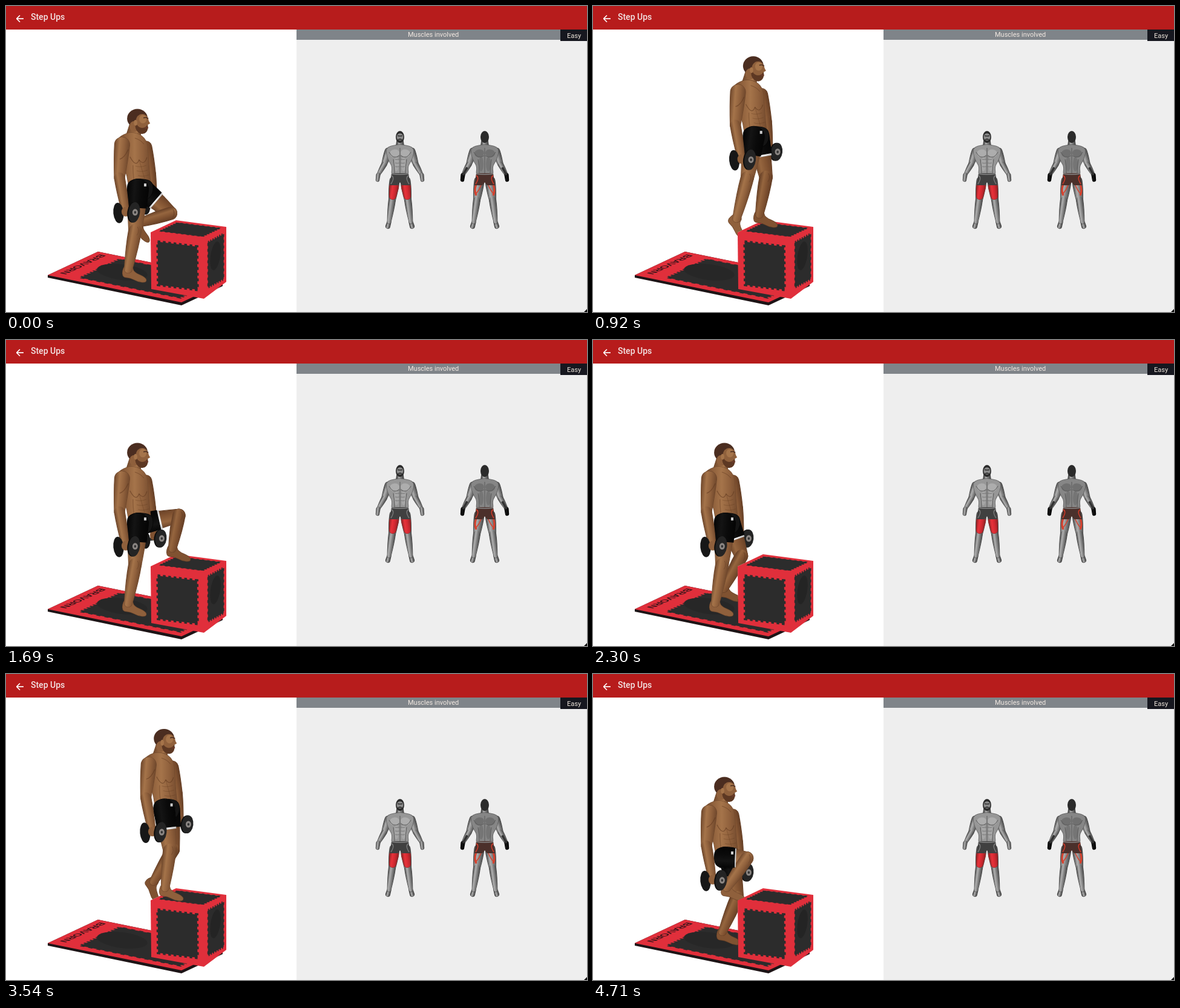
An HTML page with a canvas for the animation above (4.79 s loop, 960 by 507 pixels).

```html
<!DOCTYPE html>
<html lang="en">
<head>
<meta charset="utf-8">
<title>Step Ups</title>
<style>
html, body { margin: 0; width: 100%; height: 100%; overflow: hidden; background: #fff; }
canvas { display: block; width: 960px; height: 507px; }
</style>
</head>
<body>
<canvas id="stage" width="960" height="507"></canvas>
<script>
const LOOP = 4790, STEPS = 62, REP2 = 2300, REP_SHIFT = 2600;
const RED = '#e02f3b', DARK = '#2c2c2c', HAIR = '#4b2d20', BEARD = '#5d3823';
const SKIN = ['#70482c', '#a5744a', '#8f603c'];
const SKIN_FAR = ['#643e25', '#96663f', '#805231'];
const CLOTH = ['#050505', '#141414', '#0a0a0a'];
const HEM = ['#bbb', '#fff', '#eee'];
const GREY = ['#4a4a4a', '#b0b0b0', '#7c7c7c'];
const THIGH_RED = ['#8d2325', '#e8323a', '#cf2830'];
const INK = 'rgba(88,50,26,.5)', FAINT = 'rgba(88,50,26,.3)';

const add = (p, x, y) => [p[0] + x, p[1] + y];
const mix = (a, b, k) => [a[0] + (b[0] - a[0]) * k, a[1] + (b[1] - a[1]) * k];
const polar = (p, angle, r) => add(p, Math.sin(angle) * r, -Math.cos(angle) * r);

function ease(t, from, to) {
  const k = Math.min(1, Math.max(0, (t - from) / (to - from)));
  return k * k * (3 - 2 * k);
}
const hold = (t, a, b, c, d) => ease(t, a, b) * (1 - ease(t, c, d));
const pulse = (t, mid, width) => Math.abs(t - mid) < width ? Math.cos((t - mid) / width * Math.PI / 2) ** 2 : 0;

// ---------- drawing helpers ----------
function rect(c, x, y, w, h, color) {
  c.fillStyle = color;
  c.fillRect(x, y, w, h);
}

function poly(c, pts, fill) {
  c.beginPath();
  pts.forEach(p => c.lineTo(...p));
  c.closePath();
  c.fillStyle = fill;
  c.fill();
}

function blob(c, pts, fill, edge) {
  c.beginPath();
  c.moveTo(...mix(pts[pts.length - 1], pts[0], .5));
  pts.forEach((p, i) => c.quadraticCurveTo(...p, ...mix(p, pts[(i + 1) % pts.length], .5)));
  c.closePath();
  c.strokeStyle = edge;
  c.lineWidth = 1.4;
  c.stroke();
  c.fillStyle = fill;
  c.fill();
}

function ellipse(c, [x, y], rx, ry, fill, turn = 0) {
  c.beginPath();
  c.ellipse(x, y, rx, ry, turn, 0, 7);
  c.fillStyle = fill;
  c.fill();
}

function curve(c, a, ctrl, b, color, width = 1) {
  c.beginPath();
  c.moveTo(...a);
  c.quadraticCurveTo(...ctrl, ...b);
  c.strokeStyle = color;
  c.lineWidth = width;
  c.stroke();
}

function limbPath(c, a, b, ra, rb, bulge, flat) {
  const turn = Math.atan2(b[1] - a[1], b[0] - a[0]), right = Math.PI / 2;
  const side = (p, r) => add(p, -Math.sin(turn) * r, Math.cos(turn) * r);
  const belly = mix(a, b, .4), r = (ra + rb) / 2 + bulge * 2;
  c.beginPath();
  c.arc(...a, ra, turn + right, turn - right);
  c.quadraticCurveTo(...side(belly, -r), ...side(b, -rb));
  if (flat) c.lineTo(...side(b, rb));
  else c.arc(...b, rb, turn - right, turn + right);
  c.quadraticCurveTo(...side(belly, r), ...side(a, ra));
  c.closePath();
  return c.createLinearGradient(...side(a, ra), ...side(a, -ra));
}

function chain(c, pts, radii, bulge, tone, flat) {
  for (const outline of [true, false]) {
    for (let i = 0; i + 1 < pts.length; i++) {
      const shade = limbPath(c, pts[i], pts[i + 1], radii[i], radii[i + 1], bulge, flat);
      [tone[0], tone[1], tone[2], tone[0]].forEach((s, k) => shade.addColorStop(k / 3, s));
      c.strokeStyle = tone[0];
      c.lineWidth = 1.2;
      c.fillStyle = shade;
      outline ? c.stroke() : c.fill();
    }
  }
}

// ---------- static scene ----------
function panel(c, o, x, y, [l, t, r, b], tooth) {
  c.save();
  c.transform((x[0] - o[0]) / 100, (x[1] - o[1]) / 100, (y[0] - o[0]) / 100, (y[1] - o[1]) / 100, ...o);
  c.strokeStyle = DARK;
  rect(c, l, t, r - l, b - t, DARK);
  c.setLineDash([tooth, tooth]);
  c.lineWidth = tooth;
  c.strokeRect(l, t, r - l, b - t);
  c.restore();
}

function mat(c) {
  const left = [69, 446], top = [152, 407], low = [290, 491], right = [373, 452];
  c.save();
  c.beginPath();
  c.rect(0, 380, 358, 127);
  c.clip();
  poly(c, [left, top, right, add(right, 0, 5), add(low, 0, 5), add(left, 0, 4)], '#1d1416');
  poly(c, [left, top, right, low], RED);
  panel(c, left, low, top, [20, 12, 94, 91], 3);
  ellipse(c, [192, 441], 42, 13, '#272727', .12);
  c.transform(-.905, .425, -.98, -.195, 126, 428);
  c.font = '800 15px "Liberation Sans", Arial, sans-serif';
  c.textAlign = 'center';
  c.textBaseline = 'middle';
  c.fillStyle = '#35151a';
  c.fillText('BRAVORN', 0, 0);
  c.restore();
}

const BOX = [[239, 375], [281, 355], [364, 366], [364, 457], [327, 485], [240, 469]];
function box(c) {
  const [left, back, right, rightLow, low, leftLow] = BOX, corner = [327, 386];
  poly(c, BOX, RED);
  panel(c, left, corner, leftLow, [13, 15, 87, 91], 5);
  panel(c, corner, right, add(low, 0, -4), [18, 10, 88, 88], 5);
  panel(c, left, corner, back, [10, 15, 90, 85], 5);
  ellipse(c, [346, 414], 8, 24, '#242424', .15);
}

function muscleMan(c, cx, back) {
  const at = (x, y) => [cx + x, y], line = '#5a5a5a', flank = back ? '#d03a2a' : '#777';
  for (const s of [-1, 1]) {
    const hip = at(s * 9, 290), knee = at(s * 13, 321), ankle = at(s * 18, 358);
    chain(c, [ankle, at(s * 20, 365)], [3, 3.5], 0, GREY);
    chain(c, [hip, knee, ankle], [8, 5.5, 2.8], .7, GREY);
    if (back) {
      curve(c, at(s * 14, 296), at(s * 18, 305), at(s * 14, 314), '#d8402c', 3);
      curve(c, at(s * 6, 297), at(s * 9, 305), at(s * 15, 312), '#d8402c', 1.5);
    } else chain(c, [at(s * 10, 300), at(s * 12, 315)], [7.5, 5.5], 0, THIGH_RED);
    const elbow = at(s * 26, 262), wrist = at(s * 36, 280);
    chain(c, [at(s * 19, 241), elbow, wrist], [6, 4.2, 2.2], .5, GREY);
    chain(c, [wrist, at(s * 37, 288)], [3, 2.6], 0, back ? CLOTH : GREY);
    if (back) curve(c, mix(elbow, wrist, .3), mix(elbow, wrist, .5), wrist, '#333', 4);
  }
  chain(c, [at(0, 222), at(0, 237)], [5, 7], 0, GREY);
  blob(c, [at(-6, 230), at(-24, 235), at(-20, 254), at(-12, 266), at(-15, 282),
    at(15, 282), at(12, 266), at(20, 254), at(24, 235), at(6, 230)], back ? '#868686' : '#979797', line);
  for (const s of [-1, 1]) {
    ellipse(c, at(s * 9, 244), 8, 6.5, back ? '#707070' : '#adadad', s * .2);
    ellipse(c, at(s * 6, 262), 4, 12, back ? '#757575' : '#a6a6a6');
    curve(c, at(s, 248), at(s * 12, 255), at(s * 18, 242), line);
    curve(c, at(s * 11, 254), at(s * 9, 265), at(s * 9, 277), line);
    if (!back) for (let y = 254; y < 272; y += 6) curve(c, at(s, y), at(s * 4, y + 1), at(s * 8, y), '#777');
  }
  curve(c, at(0, 235), at(0, 255), at(0, 277), line);
  poly(c, [at(-14, 277), at(14, 277), at(17, 297), at(4, 297), at(0, 292), at(-4, 297), at(-17, 297)], back ? '#4b302b' : '#404040');
  curve(c, at(-14, 278), at(0, 280), at(14, 278), '#888', 1.5);
  for (const s of [-1, 1]) curve(c, at(s * 14, 281), at(s * 8, 284), at(s * 15, 295), flank, 1.5);
  ellipse(c, at(0, 217), 7, 10, '#2b2b2b');
  if (!back) {
    ellipse(c, at(0, 217), 5.5, 6, '#8b8b8b');
    curve(c, at(-4, 215), at(0, 216), at(4, 215), '#333', 1.5);
    curve(c, at(-3, 222), at(0, 219), at(3, 222), '#333', 2);
  }
}

function text(c, s, x, y, font, color) {
  c.font = font + ' Roboto, sans-serif';
  c.fillStyle = color;
  c.fillText(s, x, y);
}

function scene(c) {
  rect(c, 0, 0, 960, 507, '#fff');
  rect(c, 480, 39, 480, 468, '#eee');
  rect(c, 0, 0, 960, 39, '#b71c1c');
  rect(c, 480, 39, 480, 17, '#7f8489');
  rect(c, 916, 39, 44, 19, '#16171f');
  poly(c, [[960, 502], [960, 507], [955, 507]], '#111');
  text(c, 'Step Ups', 41, 23, '500 14px', '#f3e6e6');
  text(c, 'Muscles involved', 664, 51, '11px', '#f2e9e2');
  text(c, 'Easy', 927, 53, '11px', '#eee6dc');
  const tip = [17.5, 21];
  curve(c, tip, tip, [29, 21], '#fff', 1.7);
  for (const s of [-1, 1]) curve(c, tip, tip, add(tip, 5.5, s * 5.5), '#fff', 1.7);
  mat(c);
  box(c);
  muscleMan(c, 651, false);
  muscleMan(c, 791, true);
}

// ---------- motion, u = time within one repetition ----------
function bodyAt(u) {
  const rise = hold(u, 400, 1040, 1150, 1640);
  const bend = .9 * pulse(u, 570, 330) + 1.1 * pulse(u, 1410, 290);
  const hip = [221 + 52 * rise, 302 - 95 * rise];
  const neck = polar(hip, -.14 + .36 * bend, 87);
  const tilt = .6 * bend;
  const near = add(neck, -17, 14), far = add(neck, 22, 18);
  return {
    hip, neck, near, far, tilt,
    head: polar(neck, .35 + tilt, 27),
    handN: add(near, 5 + 9 * bend, 108 - 10 * bend),
    handF: add(far, 13 + 16 * bend, 85 - 11 * bend)
  };
}

// Ankle and foot turn of the leg that steps up first, and of the one that follows.
const leadFoot = u => ({
  ankle: [202 + 61 * hold(u, -60, 260, 1800, 2300), 436 - 82 * hold(u, -300, 110, 2110, 2290)],
  turn: .5 * pulse(u, 0, 250),
  thigh: 68 - 26 * pulse(u, 2090, 250)
});
const trailFoot = u => ({
  ankle: [202 + 52 * hold(u, 480, 1200, 1150, 1650), 436 - 84 * hold(u, 440, 900, 1240, 1650)],
  turn: .9 * pulse(u, 800, 380) + pulse(u, 1420, 230),
  thigh: 68
});

// Middle joint of a two-part limb; the sign of flex picks the side it bends to.
function joint(a, b, la, lb, flex) {
  const dx = b[0] - a[0], dy = b[1] - a[1], d = Math.hypot(dx, dy);
  const along = Math.min(la, (la * la - lb * lb + d * d) / (2 * d));
  const out = flex * Math.sqrt(Math.max(16, la * la - along * along)) / d;
  return add(mix(a, b, along / d), dy * out, -dx * out);
}

// ---------- athlete ----------
function dumbbell(c, hand, far) {
  const shift = far ? -3 : 0, ry = far ? 15 : 17;
  const left = add(hand, -11 + shift, far ? 12 : 5), right = add(hand, 15 + shift, far ? 10 : 4);
  curve(c, left, left, right, '#333', 5);
  ellipse(c, left, 8.5, ry, '#171717', -.1);
  ellipse(c, add(hand, 1, far ? 5 : 3), 7, 8, far ? SKIN_FAR[2] : SKIN[2]);
  ellipse(c, add(right, -2, 0), 9.5, ry, '#0c0c0c', .12);
  ellipse(c, right, 9.5, ry, '#242424', .12);
  ellipse(c, add(right, 1.5, 0), 4.5, 5.5, '#8a8582');
  ellipse(c, add(right, 1.5, 0), 1.8, 2.2, '#333');
}

function foot(c, ankle, turn, tone) {
  c.save();
  c.translate(...ankle);
  c.rotate(turn);
  blob(c, [[-7, -7], [-11, 13], [4, 14], [16, 21], [30, 22], [29, 14], [8, 5], [7, -7]], tone[2], tone[0]);
  c.restore();
}

function leg(c, hip, { ankle, turn, thigh }, isFar, lead) {
  const tone = isFar ? SKIN_FAR : SKIN, behindBox = ankle[0] < 240;
  const heel = isFar ? add(ankle, 12, -9) : ankle, top = add(hip, isFar ? 5 : -3, 2);
  const knee = joint(top, heel, thigh, 63, .85);
  c.save();
  if (behindBox) {
    c.beginPath();
    c.rect(0, 0, 480, 507);
    BOX.forEach((p, i) => i ? c.lineTo(...p) : c.moveTo(...p));
    c.closePath();
    c.clip('evenodd');
  }
  foot(c, heel, turn, tone);
  chain(c, [top, knee, heel], [16, 10.5, 6.5], 1.2, tone);
  curve(c, add(knee, 4, -6), add(knee, 8, 1), add(knee, 3, 8), tone[0], .8);
  c.restore();
  if (lead) chain(c, [top, mix(top, knee, .49)], [17, 15], 0, HEM, true);
  chain(c, [top, mix(top, knee, .44)], [17.5, 16], 0, CLOTH, true);
}

function drawHead(c, at, tilt) {
  c.save();
  c.translate(...at);
  c.rotate(tilt * .45);
  ellipse(c, [-1, -4], 17, 16, HAIR);
  ellipse(c, [-6, 9], 8, 9, SKIN[2]);
  ellipse(c, [6, 9], 10.5, 12.5, BEARD, -.25);
  ellipse(c, [7, 0], 10.5, 11.5, SKIN[2]);
  ellipse(c, [8, -3], 6, 7, SKIN[1]);
  poly(c, [[15, -5], [20, 4], [15, 7]], SKIN[2]);
  ellipse(c, [-4, 3], 2.8, 4.8, SKIN[1]);
  curve(c, [9, -5], [13, -7], [17, -4], HAIR, 1.6);
  curve(c, [11, 11], [14, 12], [17, 11], '#6f3c2d', 1.4);
  c.restore();
}

function torso(c, { hip, neck, near, far }) {
  const waistL = add(hip, -18, -8), waistR = add(hip, 19, -8);
  const shade = c.createLinearGradient(near[0] - 8, 0, far[0] + 10, 0);
  [SKIN[0], SKIN[2], SKIN[1], SKIN[2], SKIN[0]].forEach((s, i) => shade.addColorStop(i / 4, s));
  blob(c, [add(neck, -8, -7), add(near, -12, -7), add(near, -7, 22), mix(near, waistL, .7), add(waistL, 0, 10),
    add(waistR, 0, 10), mix(far, waistR, .65), add(far, 4, 18), add(far, 3, -8), add(neck, 13, -4)], shade, SKIN[0]);
  const chest = add(mix(near, far, .72), 0, 22), navel = add(hip, 8, -16);
  curve(c, add(near, 13, 20), add(chest, -5, 14), chest, INK, 1.2);
  curve(c, chest, add(chest, 8, 11), add(far, 2, 17), INK, 1.2);
  curve(c, add(neck, 4, 3), add(neck, 14, 6), add(far, -3, -5), INK);
  curve(c, chest, mix(chest, navel, .6), navel, FAINT);
  for (const k of [.3, .55, .8]) {
    const p = mix(chest, navel, k);
    curve(c, add(p, -9, 1), add(p, -1, 4), add(p, 9, 0), FAINT);
  }
  curve(c, add(near, 18, 34), mix(near, hip, .6), add(waistL, 9, 0), FAINT, 1.5);
}

function athlete(c, t) {
  const rep2 = t >= REP2, u = rep2 ? t - REP_SHIFT : t;
  const body = bodyAt(u), { hip, neck, head, near, far, handN, handF } = body;
  const lead = leadFoot(u), trail = trailFoot(u);

  chain(c, [far, add(mix(far, handF, .5), 2, 2), handF], [10, 8, 5], .6, SKIN_FAR);
  dumbbell(c, handF, true);
  leg(c, hip, rep2 ? trail : lead, true, !rep2);
  chain(c, [add(neck, 1, 2), add(head, -4, 8)], [12, 10], 0, SKIN);
  torso(c, body);
  blob(c, [add(hip, -18, -15), add(hip, 19, -15), add(hip, 23, 4), add(hip, 14, 20), add(hip, -14, 20), add(hip, -22, 6)], CLOTH[1], CLOTH[0]);
  leg(c, hip, rep2 ? lead : trail, false, rep2);
  rect(c, hip[0] + 7, hip[1] - 8, 4, 5, '#ccc');
  const elbow = joint(near, handN, 54.5, 54.5, -1);
  chain(c, [near, elbow, handN], [12.5, 8.5, 6], .8, SKIN);
  curve(c, add(near, 10, 8), add(near, 4, 22), add(near, -4, 24), INK, 1.2);
  dumbbell(c, handN, false);
  drawHead(c, head, body.tilt);
}

// ---------- run ----------
const ctx = document.getElementById('stage').getContext('2d');
const backdrop = document.createElement('canvas');
backdrop.width = 960;
backdrop.height = 507;
scene(backdrop.getContext('2d'));

const begin = performance.now();
function frame() {
  const t = (performance.now() - begin) % LOOP;
  const step = Math.floor(t / LOOP * STEPS + .15) % STEPS;
  ctx.drawImage(backdrop, 0, 0);
  athlete(ctx, step * LOOP / STEPS);
  requestAnimationFrame(frame);
}
frame();
</script>
</body>
</html>
```
